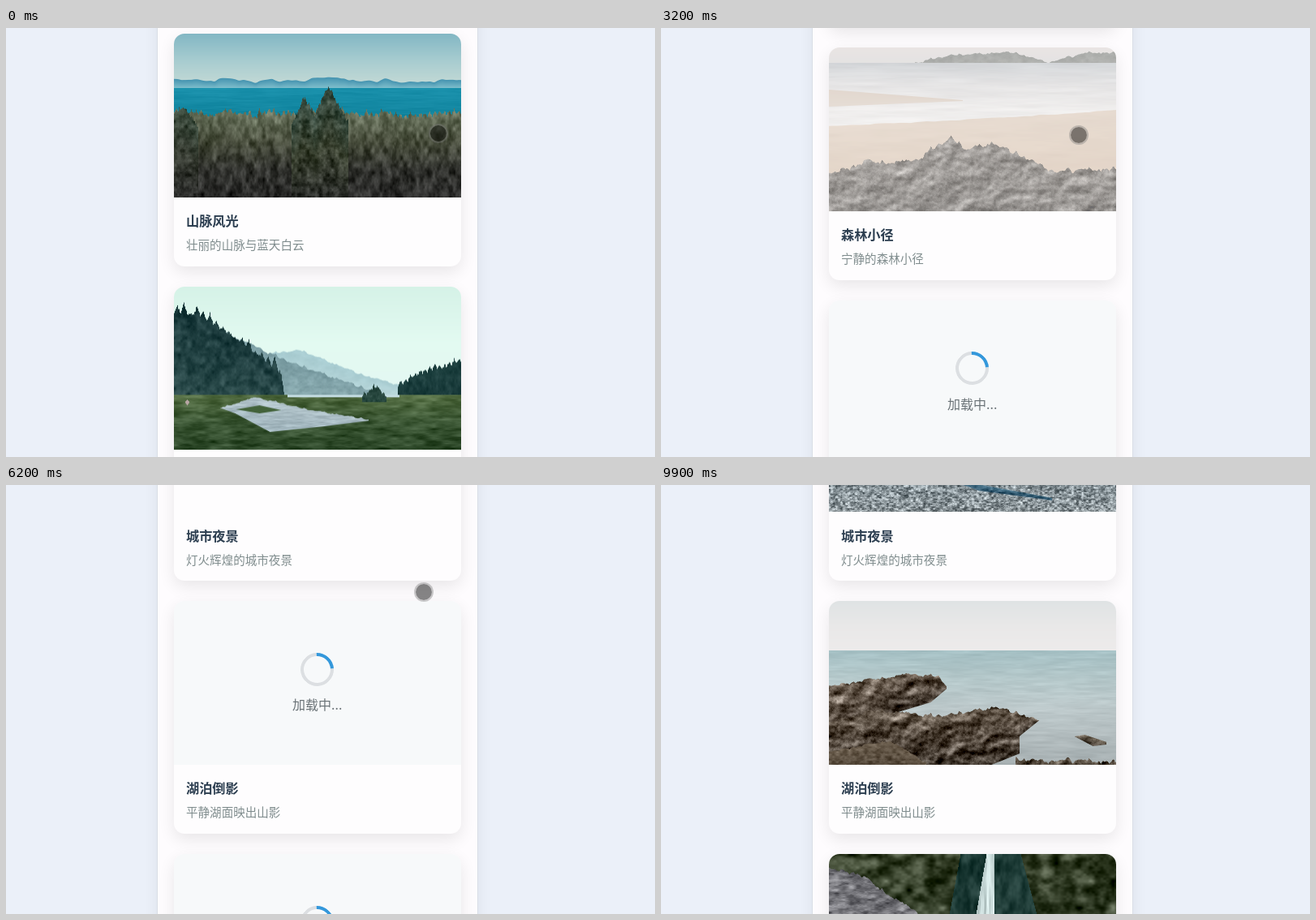
Write an HTML page with a canvas that moves like this. It is 800 px wide and 529 px high and loops after 10000 ms.

```html
<!DOCTYPE html>
<html lang="zh-CN">
<head>
<meta charset="utf-8">
<style>
  html, body { margin: 0; width: 100%; height: 100%; overflow: hidden; }
  body { position: relative; background: #ebf0f9; font-family: "Noto Sans CJK SC", "Noto Sans CJK JP", "Noto Sans CJK", sans-serif; }
  .phone { position: absolute; left: 187px; top: -40px; width: 394px; height: 640px; background: #fefcfe; box-shadow: 0 0 1px rgba(0,0,0,.25), 0 0 18px rgba(0,0,0,.07); overflow: hidden; }
  .list { position: absolute; left: 20px; top: 40px; width: 353.6px; }
  .card { position: absolute; left: 0; width: 100%; height: 286.6px; border-radius: 13px; background: #fefdfe; box-shadow: 0 7px 20px rgba(0,0,0,.09); }
  .photo { position: absolute; inset: 0 0 auto; height: 201.6px; border-radius: 13px 13px 0 0; overflow: hidden; }
  canvas { position: absolute; width: 100%; height: 100%; }
  .loader { position: absolute; inset: 0; background: #f7f9fa; }
  .ring { position: absolute; left: 156.3px; top: 63.5px; width: 33px; height: 33px; border: 4px solid #dcdfe2; border-top-color: #3498db; border-radius: 50%; }
  .wait { position: absolute; top: 115px; width: 100%; text-align: center; font-size: 16px; line-height: 24px; color: #6a7276; }
  h3, p { position: absolute; left: 15px; margin: 0; white-space: nowrap; }
  h3 { top: 218px; font-size: 16.2px; line-height: 24px; color: #2c3e50; }
  p { top: 249px; font-size: 14.56px; line-height: 22px; color: #7f8c8d; }
  .thumb { position: absolute; right: 0; top: 40px; width: 4.5px; height: 305px; background: #b9b9bb; }
  .touch { position: absolute; left: -12px; top: -12px; width: 20px; height: 20px; border: 2px solid rgba(120,120,120,.38); border-radius: 50%; background: rgba(0,0,0,.47); background-clip: padding-box; }
</style>
</head>
<body>
<div class="phone"><div class="list"></div><div class="thumb"></div></div>
<div class="touch"></div>
<script>
const W = 354, H = 202, PITCH = 311.6, LOOP = 10000, STEP = 100;

const clamp = x => Math.min(1, Math.max(0, x));
const mix = (a, b, k) => a + (b - a) * k;
// Close to the CSS "ease" curve
const ease = x => 1 - Math.pow(1 - x, 2.3) * (1 + .3 * x);

function track(keys, t) {
  const i = keys.findIndex(k => k[0] > t);
  if (i === 0) return keys[0][1];
  if (i < 0) return keys[keys.length - 1][1];
  const [t0, a] = keys[i - 1], [t1, b] = keys[i];
  return mix(a, b, (t - t0) / (t1 - t0));
}

// Seeded noise
function hash(i, j) {
  let h = Math.imul(i, 374761393) + Math.imul(j, 668265263);
  h = Math.imul(h ^ h >>> 13, 1274126177);
  return ((h ^ h >>> 16) >>> 0) / 2 ** 32;
}
function noise(x, y) {
  const i = Math.floor(x), j = Math.floor(y);
  const soft = u => u * u * (3 - 2 * u);
  const u = soft(x - i), v = soft(y - j);
  return mix(mix(hash(i, j), hash(i + 1, j), u), mix(hash(i, j + 1), hash(i + 1, j + 1), u), v);
}
const fbm = (x, y) => (noise(x, y) * 4 + noise(x * 2, y * 2) * 2 + noise(x * 4, y * 4)) / 7;

// Textures give a brightness offset around zero
const grain = (sx, sy, amp) => (x, y) => (fbm(x / sx, y / sy) - .5) * 3 * amp;
const relief = (s, amp) => (x, y) =>
  (fbm(x / s, y / s * 1.4) - fbm((x + 3) / s, (y + 4) / s * 1.4)) * 3 * amp + grain(2, 2, amp / 4)(x, y);
const plain = () => 0;

// Outlines map x to y
const line = (...keys) => Object.assign(x => track(keys, x), { from: keys[0][0], to: keys[keys.length - 1][0] });
const flat = y => line([0, y], [W, y]);
const rough = (edge, size, s = 5) => Object.assign(x => edge(x) + (fbm(x / s, 3) - .5) * size, { from: edge.from, to: edge.to });
const trees = (edge, width, size) => Object.assign(x => {
  const i = Math.floor(x / width), u = x / width - i;
  return edge(x) - size * hash(i, 9) * Math.max(0, 1 - Math.abs(2 * u - 1)) + 3 * noise(x, 5);
}, { from: edge.from, to: edge.to });

const rgb = hex => [1, 3, 5].map(i => parseInt(hex.slice(i, i + 2), 16));

// Fills the area between two outlines with a vertical gradient and a texture
function painter(img) {
  return (top, bottom, colors, tex = plain) => {
    const stops = colors.map(rgb), last = stops.length - 1;
    for (let x = top.from; x < Math.min(W, top.to); x++) {
      const a = top(x), b = bottom(x);
      for (let y = Math.max(0, Math.floor(a)); y < Math.min(H, b); y++) {
        const g = clamp((y - a) / (b - a)) * last, i = Math.min(last, Math.floor(g));
        const c0 = stops[i], c1 = stops[Math.min(last, i + 1)];
        const v = tex(x, y), cover = Math.min(clamp(y + 1 - a), clamp(b - y)), p = (y * W + x) * 4;
        for (let k = 0; k < 3; k++) img.data[p + k] = mix(img.data[p + k], mix(c0[k], c1[k], g - i) + v, cover);
        img.data[p + 3] = 255;
      }
    }
  };
}
const TOP = flat(0), END = flat(H);

function forest(paint) {
  paint(TOP, flat(62), ['#83b7c4', '#a5cbcf', '#c3d9d5']);
  paint(rough(flat(57), 9, 20), flat(68), ['#4795b1', '#86c3cf']);
  paint(flat(67), flat(115), ['#1990ab', '#0d7f99'], grain(30, 2, 5));
  paint(trees(rough(flat(98), 12, 20), 6, 9), END, ['#67715b', '#474c3b', '#31322e', '#282827'], grain(5, 9, 30));
  paint(trees(line([145, 112], [160, 78], [173, 100], [190, 64], [215, 112]), 4, 6), END, ['#34483c', '#39402f', '#282a27'], grain(5, 6, 30));
  paint(trees(line([0, 98], [12, 90], [30, 115]), 4, 5), END, ['#38483a', '#353a30', '#282827'], grain(5, 6, 26));
}

function river(paint) {
  paint(TOP, flat(140), ['#d5f2e7', '#e3faf1', '#e3f7f2']);
  paint(rough(line([110, 84], [155, 78], [230, 109], [280, 122]), 4), flat(136), ['#a9cdd2', '#bcd9dc'], grain(9, 5, 5));
  paint(rough(line([45, 48], [130, 88], [255, 134]), 6), flat(136), ['#7b9da3', '#8aabb0'], grain(6, 4, 12));
  paint(trees(line([0, 32], [30, 34], [75, 62], [130, 106], [136, 134]), 8, 20), flat(137), ['#1c3b3d', '#2a4a4a'], grain(6, 7, 20));
  paint(trees(line([276, 122], [300, 108], [W, 92]), 6, 9), flat(137), ['#1f4241', '#193a3a'], grain(4, 7, 12));
  paint(flat(134), END, ['#4e683d', '#3a5533', '#2b4627'], grain(16, 4, 24));
  paint(line([140, 134], [278, 134]), flat(137), ['#c4dce1']);
  paint(rough(line([56, 150], [100, 137], [165, 152], [240, 165]), 3), line([56, 150], [75, 157], [118, 180], [185, 173], [240, 166]), ['#b0c2c9', '#a5b9c1'], grain(14, 2, 18));
  paint(line([76, 152], [105, 147], [132, 153]), line([76, 152], [105, 157], [132, 153]), ['#42623a']);
  paint(rough(line([232, 135], [246, 123], [262, 136]), 8, 2), flat(143), ['#2b4a42', '#24443b'], grain(3, 3, 14));
  paint(line([13, 143], [16, 140], [19, 143]), line([13, 143], [16, 147], [19, 143]), ['#b9a6a4']);
}

function beach(paint) {
  paint(TOP, flat(20), ['#d9d3cf', '#d0cfcd']);
  paint(rough(line([106, 19], [150, 9], [225, 6], [270, 18], [320, 6], [W, 6]), 4), flat(20), ['#6d726c', '#7a7d77'], grain(6, 4, 12));
  paint(flat(19), flat(100), ['#b5bbbe', '#d4d4d3', '#e3e2df', '#e9e8e5'], grain(50, 4, 8));
  paint(line([0, 52], [165, 65]), line([0, 73], [165, 66]), ['#cdbdac', '#d3c5b6']);
  paint(rough(line([0, 97], [190, 88], [W, 77]), 2, 20), END, ['#d6c3af', '#cbb196'], grain(40, 6, 4));
  paint(rough(line([0, 156], [45, 141], [105, 140], [150, 110], [169, 125], [200, 118], [280, 153], [W, 148]), 9), END, ['#605b53', '#4f4b44'], relief(16, 70));
}

function pebbles(paint) {
  paint(TOP, flat(110), ['#dfe5e8', '#6f939f']);
  paint(flat(110), END, ['#87979f', '#8b9498'], grain(3, 2, 75));
  paint(line([140, 160], [275, 185]), line([140, 160], [185, 176], [275, 188]), ['#3a657c', '#2f5369'], grain(5, 2, 35));
}

function coast(paint) {
  paint(TOP, flat(62), ['#dfe3e4', '#e9e8e8', '#edebeb']);
  paint(flat(61), END, ['#a5c0c4', '#b5c8ca', '#bcc8ca', '#b2bcbe', '#a5aeb0'], grain(26, 3, 8));
  const stone = relief(15, 75);
  paint(rough(line([0, 105], [50, 97], [95, 90], [135, 93], [145, 105]), 5), line([0, H], [60, 165], [75, 140], [125, 125], [145, 108]), ['#6a5d50', '#3b3128'], stone);
  paint(rough(line([0, 150], [60, 134], [130, 142], [205, 131], [259, 147]), 7), line([0, H], [200, H], [235, 188], [228, 172], [259, 147]), ['#63574a', '#4c4136', '#3d342b'], stone);
  paint(rough(line([0, 186], [75, 172], [120, 200]), 4), END, ['#6a5d4d', '#514537'], grain(5, 3, 22));
  paint(line([302, 167], [315, 165], [342, 174]), line([302, 167], [325, 179], [342, 177]), ['#6a6052', '#40372d'], stone);
  paint(rough(line([230, 196], [W, 197]), 9), END, ['#5b5043', '#453b30'], stone);
}

function falls(paint) {
  paint(TOP, END, ['#3a442d', '#303c29'], grain(14, 11, 48));
  paint(line([148, 75], [162, 0], [236, 0], [256, 75]), END, ['#1d3b36', '#1b3632'], grain(8, 16, 24));
  paint(rough(line([0, 18], [35, 24], [120, 80], [180, H]), 7), END, ['#77777c', '#6f6f75'], grain(9, 4, 45));
  paint(line([174, H], [181, 75], [189, 28], [194, 0], [204, 0]), END, ['#c6d8d7', '#d2e0df'], grain(3, 30, 30));
}

// hide: placeholder disappears; show: photo starts to fade in
const CARDS = [
  { title: '山脉风光', text: '壮丽的山脉与蓝天白云', draw: forest },
  { title: '海滩日落', text: '金色阳光洒在海面上', draw: river },
  { title: '森林小径', text: '宁静的森林小径', draw: beach, hide: 2900, show: 3030 },
  { title: '城市夜景', text: '灯火辉煌的城市夜景', draw: pebbles, hide: 4300, show: 6750 },
  { title: '湖泊倒影', text: '平静湖面映出山影', draw: coast, hide: 6600, show: 6600 },
  { title: '', text: '', draw: falls, hide: 6700, show: 6820 }
];
const SCROLLS = [{ from: 400, to: 2200, y: 606 }, { from: 3400, to: 4880, y: 504 }];

const $ = s => document.querySelector(s);
const list = $('.list'), thumb = $('.thumb'), touch = $('.touch');

CARDS.forEach((card, i) => {
  const el = document.createElement('div');
  el.className = 'card';
  el.style.top = 7 + i * PITCH + 'px';
  el.innerHTML = `<div class="photo"><canvas width="${W}" height="${H}"></canvas>` +
    (card.hide ? '<div class="loader"><div class="ring"></div><div class="wait">加载中...</div></div>' : '') +
    `</div><h3>${card.title}</h3><p>${card.text}</p>`;
  list.append(el);
  card.canvas = el.querySelector('canvas');
  card.loader = el.querySelector('.loader');
  card.ring = el.querySelector('.ring');
  const c = card.canvas.getContext('2d'), img = c.createImageData(W, H);
  card.draw(painter(img));
  c.putImageData(img, 0, 0);
});

function render(t) {
  let y = 0, bar = 0;
  for (const s of SCROLLS) {
    y += s.y * clamp((t - s.from) / (s.to - s.from));
    bar += clamp((t - s.from) / 50) * clamp((s.to + 650 - t) / 200);
  }
  y = Math.round(y);
  list.style.transform = `translateY(${-y}px)`;
  thumb.style.transform = `translateY(${-319.3 + .361 * y}px)`;
  thumb.style.opacity = bar;

  const drift = clamp((t - 2500) / 400), leave = clamp((t - 8300) / 400);
  touch.style.transform = `translate(${533 - 18 * drift + 67 * leave}px, ${130 + 2 * drift}px)`;
  touch.style.visibility = t < 8800 ? 'visible' : 'hidden';

  for (const { canvas, loader, ring, hide, show } of CARDS) {
    if (!loader) continue;
    canvas.style.opacity = ease(clamp((t - show) / 500));
    loader.style.visibility = t < hide ? 'visible' : 'hidden';
    ring.style.transform = `rotate(${t * .36 - 30}deg)`;
  }
}

const start = performance.now();
function tick() {
  const t = (performance.now() - start + 5) % LOOP;
  render(Math.floor(t / STEP) * STEP);
  requestAnimationFrame(tick);
}
tick();
</script>
</body>
</html>
```
